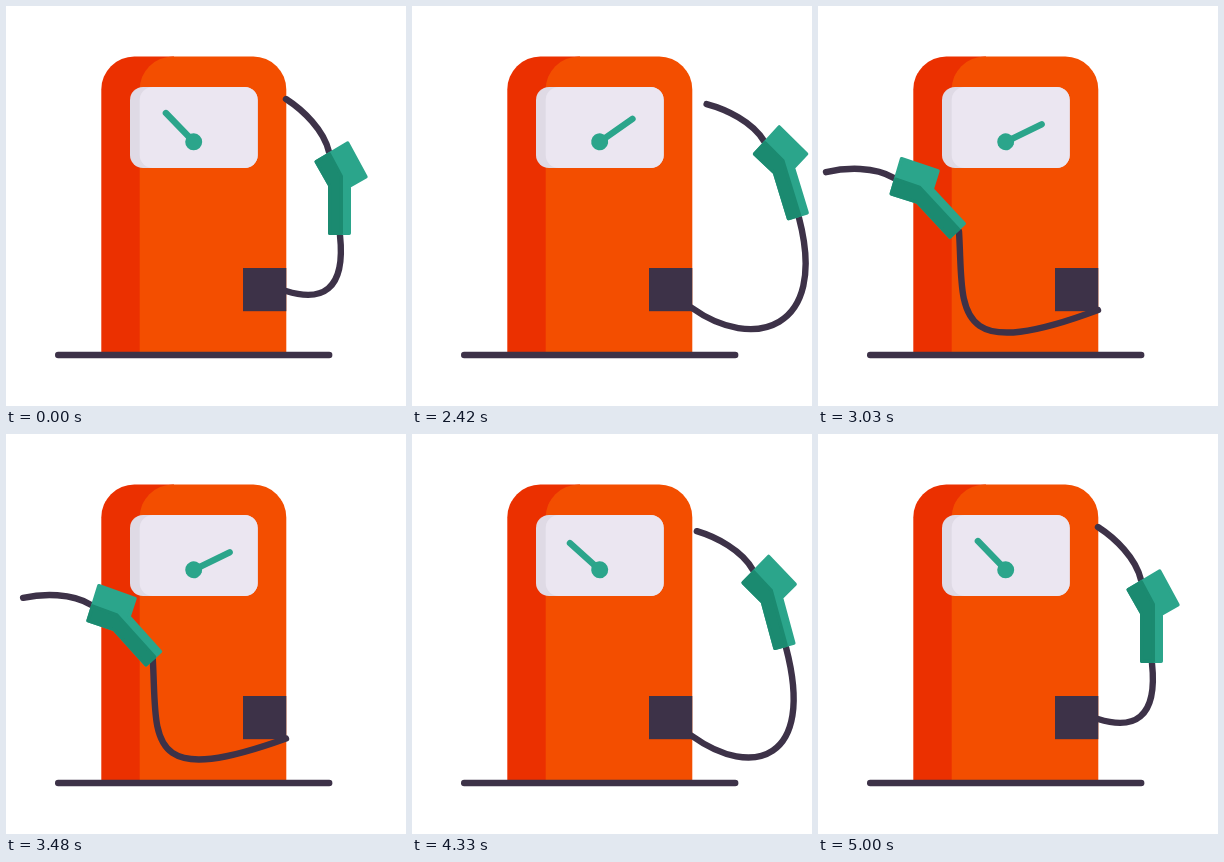
Write an HTML page that moves like this. It is 400 px wide and 400 px high and loops after 5.06 s.

```html
<!DOCTYPE html>
<html lang="en">
<head>
<meta charset="utf-8">
<title>Fuel pump</title>
<style>
  html, body { margin: 0; width: 100%; height: 100%; overflow: hidden; background: #fff; }
  svg { display: block; width: 100%; height: 100%; }
  .ink { fill: none; stroke: #3d3248; stroke-width: 6.4; stroke-linecap: round; }
  .teal { fill: #2ba58b; stroke: #2ba58b; }
  .shade { fill: #1b8a70; stroke: #1b8a70; }
  .nozzle { stroke-width: 3.4; stroke-linejoin: round; }
</style>
</head>
<body>
<svg viewBox="0 0 400 400">
  <path fill="#eb3000" d="M95.300 347V83.500a33 33 0 0 1 33-33H168V347z"/>
  <path fill="#f34e00" d="M133.700 347V83.500a33 33 0 0 1 33-33H247.300a33 33 0 0 1 33 33V347z"/>
  <rect x="124" y="81" width="127.700" height="81" rx="13" fill="#dfdae5"/>
  <rect x="133.700" y="81" width="118" height="81" rx="13" fill="#ebe6f1"/>
  <g id="gauge" class="teal">
    <path d="M187.700 135.800V95.800" stroke-width="6.400" stroke-linecap="round"/>
    <circle cx="187.700" cy="135.800" r="8.500" stroke="none"/>
  </g>
  <rect x="237" y="262" width="43.300" height="43.200" fill="#3d3248"/>
  <path class="ink" d="M52.200 349H323.200"/>
  <path id="hose" class="ink"/>
  <path id="spout" class="ink" d="M280 93C297 104 318 124 323 146"/>
  <g id="gun">
    <path class="teal nozzle" d="M310.200 155.700L341.700 137L360 170.800L343.300 180.300V227.300H323.700V179.500z"/>
    <path class="shade nozzle" d="M310.200 155.700L323.400 148L335.300 170.400V227.300H323.700V179.500z"/>
  </g>
</svg>
<script>
const LOOP = 5060;
const HOSE_LAG = 9;
const JOINT = [323, 146];
const GRIP = [11, 83.5]; // foot of the handle, seen from the joint
const el = id => document.getElementById(id);

// joint x, y, angle; hose start y, first control x, y, second control from the grip
const rest = [323, 146, 0, 285, 315, 296, 6, 56];
const right = [341, 136, -15.2, 302, 340, 345, 30, 114];
const out = [352, 135, -17, ...right.slice(3)];
const across = [132, 190, -40.5, 320, 282, 357, 40, 82];
const left = [76, 172, -43, 304, 130, 360, 5, 78];
const back = [347.5, 136.5, -16.2, 318, 330, 256, -4, 132];

const moves = [
  [2000, rest], [2360, out], [2480, out], [2720, across], [2880, left],
  [3425, left], [3930, back], [4100, out], [4330, right], [4740, rest]
];
const needle = [
  [2000, [-44]], [2550, [71]], [2900, [64]], [3480, [64]], [4330, [-48]], [4700, [-44]]
];

// Slope at key i: flat at ends and turning points, harmonic mean elsewhere
function slope(keys, i, c) {
  if (i === 0 || i === keys.length - 1) return 0;
  const rate = k => (keys[k + 1][1][c] - keys[k][1][c]) / (keys[k + 1][0] - keys[k][0]);
  const a = rate(i - 1), b = rate(i);
  return a * b <= 0 ? 0 : 2 * a * b / (a + b);
}

// Smooth cubic through the keys
function sample(keys, t) {
  const next = keys.findIndex(k => k[0] > t);
  if (next === 0) return keys[0][1];
  if (next < 0) return keys[keys.length - 1][1];
  const i = next - 1;
  const [t0, from] = keys[i], [t1, to] = keys[next];
  const d = t1 - t0, u = (t - t0) / d, v = 1 - u;
  return from.map((p, c) =>
    p * v * v * (1 + 2 * u) + to[c] * u * u * (3 - 2 * u)
    + d * u * v * (v * slope(keys, i, c) - u * slope(keys, next, c)));
}

function gripAt(t) {
  const [x, y, angle] = sample(moves, t);
  const r = angle * Math.PI / 180, cos = Math.cos(r), sin = Math.sin(r);
  return [x + GRIP[0] * cos - GRIP[1] * sin, y + GRIP[0] * sin + GRIP[1] * cos];
}

function place(id, x, y, angle) {
  el(id).setAttribute('transform',
    `translate(${x - JOINT[0]} ${y - JOINT[1]}) rotate(${angle} ${JOINT})`);
}

function draw(t) {
  const [x, y, angle, y0, cx, cy, dx, dy] = sample(moves, t);
  place('gun', x, y, angle);
  place('spout', x, y, angle * 1.07); // bends a little further than the gun

  const [ex, ey] = gripAt(t - HOSE_LAG);
  el('hose').setAttribute('d', `M280 ${y0}C${[cx, cy, ex + dx, ey + dy, ex, ey]}`);
  el('gauge').setAttribute('transform', `rotate(${sample(needle, t)[0]} 187.7 135.8)`);
}

function tick() {
  draw(performance.now() % LOOP);
  requestAnimationFrame(tick);
}
tick();
</script>
</body>
</html>
```
